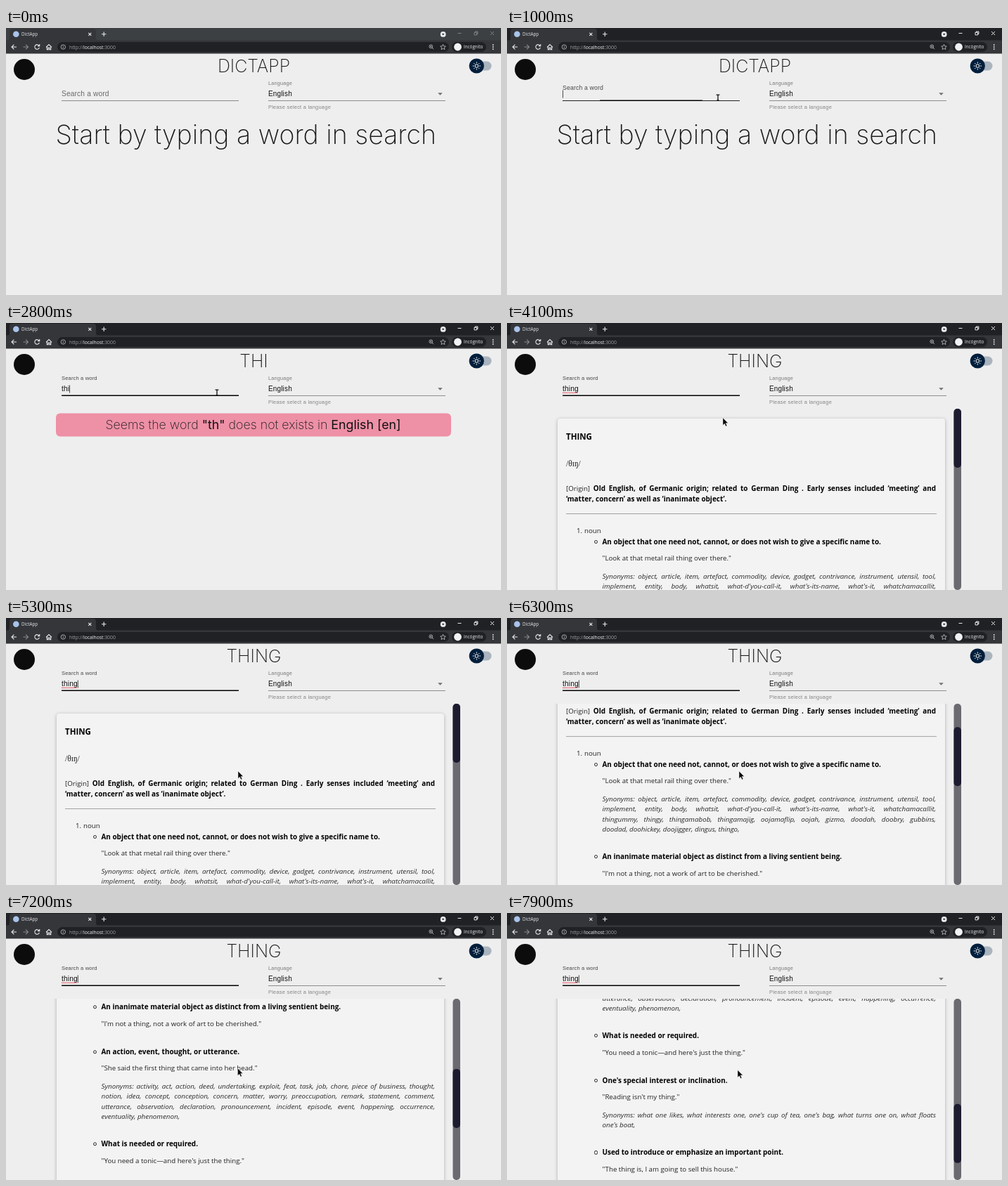
An HTML page that plays this animation: 704x380 px, repeating every 8 s.

```html
<!DOCTYPE html>
<html lang="en">
<head>
<meta charset="utf-8">
<title>DictApp</title>
<style>
  html, body { margin: 0; width: 704px; height: 380px; overflow: hidden; background: #eee; }
  svg { position: absolute; left: 0; top: 0; }
  .ui { font-family: "Open Sans", "Noto Sans", sans-serif; }
  .thin { font-family: Inter, Lato, sans-serif; font-weight: 200; fill: #1a1a1a; }
  .thin .em { font-weight: 400; fill: #111; }
  .form { font-family: "Liberation Sans", Arial, sans-serif; letter-spacing: .0094em; }
  #view { position: absolute; left: 0; top: 122px; width: 634px; height: 258px; overflow: hidden; }
  #doc { position: absolute; left: 0; top: -122px; width: 634px; height: 1000px; }
  #card { position: absolute; left: 72px; top: 136px; width: 551px; height: 900px; border-radius: 4px;
    background: #f3f3f3; box-shadow: 0 1px 5px rgba(0,0,0,.28); }
  .line { position: absolute; white-space: nowrap; line-height: 14.4px; color: #222;
    font: 9.7px/14.4px "Open Sans", "Noto Sans", sans-serif; }
  .fill { text-align: justify; text-align-last: justify; }
  .b, .line b { font-size: 9.95px; font-weight: 700; color: #000; }
  .i { font-size: 9.85px; font-style: italic; color: #2c2c2c; }
  .h { font-size: 11.5px; font-weight: 700; color: #000; }
  .ipa { font-family: "Liberation Serif", "Noto Serif", serif; font-size: 11.5px; }
  .dot { position: absolute; left: 124px; width: 3.4px; height: 3.4px; border: .8px solid #222; border-radius: 50%; }
  #rule { position: absolute; left: 84px; top: 271px; width: 527px; height: 1px; background: #a2a2a2; }
</style>
</head>
<body>
<svg width="704" height="380" viewBox="0 0 704 380">
  <rect width="704" height="380" fill="#eee"/>

  <!-- browser bar -->
  <rect id="strip" width="704" height="18" fill="#202124"/>
  <path d="M2 18Q5 18 5 14V5Q5 1 9 1H124Q128 1 128 5V14Q128 18 131 18Z" fill="#35363a"/>
  <rect y="17.5" width="704" height="19" fill="#35363a"/>
  <rect x="73" y="20" width="557" height="14" rx="7" fill="#202124"/>
  <rect x="634" y="20" width="49" height="14" rx="7" fill="#202124"/>
  <circle cx="14.3" cy="8.7" r="4.3" fill="#a9c4ea"/>
  <g class="ui" fill="#e8eaed">
    <text x="22" y="11" font-size="6.3">DictApp</text>
    <text x="90" y="29.5" font-size="6.8" fill="#9aa0a6">http://<tspan fill="#f1f3f4">localhost</tspan>:3000</text>
    <text x="651" y="29.2" font-size="6.3">Incógnito</text>
  </g>
  <circle cx="642.5" cy="27" r="5.4" fill="#f1f3f4"/>
  <g fill="none" stroke="#e8eaed" stroke-width="1.1">
    <path d="M117.3 6.8l4 4m0-4l-4 4M136 8.8h6.4m-3.2-3.2v6.4"/>
    <path d="M15 27H8m3.4-3.4L8 27l3.4 3.4"/>
    <path d="M24.500 27h7m-3.400-3.400L31.500 27l-3.400 3.400" stroke="#85888c"/>
    <path d="M47 25.2a3.300 3.300 0 1 0 .4 2.600M47.700 23v2.700h-2.700"/>
    <path d="M57 27.300L61 23.500l4 3.800M58.300 26.500V30.600h1.800V28h1.800v2.600h1.800V26.500"/>
    <g stroke="#c4c7cb" stroke-width=".8">
      <circle cx="81.300" cy="27" r="3.200"/>
      <path d="M81.300 26.500v2.200m0-3.600v.8"/>
      <circle cx="604.300" cy="26.300" r="2.400"/>
      <path d="M606 28l2.200 2.200M603.200 26.300h2.200m-1.100-1.100v2.200"/>
      <path d="M621.500 23.300l1.100 2.500 2.700.3-2 1.800.6 2.700-2.400-1.400-2.400 1.400.6-2.700-2-1.800 2.700-.3z"/>
    </g>
  </g>
  <g fill="#e8eaed">
    <circle cx="692.700" cy="24" r=".9"/><circle cx="692.700" cy="27" r=".9"/><circle cx="692.700" cy="30" r=".9"/>
    <circle cx="621.700" cy="8.900" r="3.900"/>
  </g>
  <path d="M619.900 8h3.600l-1.800 2.200z" fill="#202124"/>
  <path id="buttons" d="M642.500 7.500h5M666 6.300h3.600v3.600h-3.600zM667.300 6.300v-1.300h3.600v3.600h-1.300M689 5l5 5m0-5l-5 5" fill="none" stroke="#fff" stroke-width=".9"/>

  <!-- page header -->
  <circle cx="26" cy="59" r="15" fill="#0c0c0c"/>
  <text id="title" class="thin" x="352.500" y="63" font-size="25" text-anchor="middle"></text>
  <rect x="664" y="47.500" width="26.500" height="13" rx="6.500" fill="#aab4be"/>
  <circle cx="669.300" cy="54" r="10.600" fill="#001e3c"/>
  <g fill="none" stroke="#fff" stroke-width="1">
    <circle cx="669.300" cy="54" r="2.300"/>
    <path id="rays"/>
  </g>

  <!-- form -->
  <g class="form">
    <text id="label" font-size="10.200" fill="#6a6a6a">Search a word</text>
    <text id="typed" x="79" y="97.300" font-size="10.200" fill="#111"></text>
    <text x="373" y="81" font-size="7.400" fill="#7a7a7a">Language</text>
    <text x="373" y="97.300" font-size="10" fill="#111">English</text>
    <text x="373" y="115" font-size="7.450" fill="#858585" style="letter-spacing:.033em">Please select a language</text>
  </g>
  <path id="spell" d="M79 99.300H100.500" stroke="#e02a3a" stroke-width="1" stroke-dasharray="1.600 .6"/>
  <rect id="caret" y="88.500" width=".8" height="11" fill="#222"/>
  <path id="base" d="M79 103.500H331" stroke-width="1"/>
  <path id="focus" stroke="#000" stroke-width="1.600"/>
  <path d="M373 103.500H625" stroke="#8e8e8e" stroke-width="1"/>
  <path d="M614.200 92.300h6.600l-3.300 3.400z" fill="#707070"/>

  <!-- messages -->
  <text id="hint" class="thin" x="70.500" y="164.500" font-size="37.500">Start by typing a word in search</text>
  <g id="error">
    <rect x="71" y="128.500" width="562" height="33" rx="6" fill="#ee90a6"/>
    <text class="thin" x="351.500" y="151.300" font-size="17.800" text-anchor="middle">Seems the word <tspan id="miss" class="em"></tspan> does not exists in <tspan class="em">English [en]</tspan></text>
  </g>
</svg>

<div id="view"><div id="doc"><div id="card"></div><div id="rule"></div></div></div>

<svg width="704" height="380" viewBox="0 0 704 380">
  <g id="bar">
    <rect x="635.500" y="122" width="10.500" height="258" rx="5" fill="#6a6a70"/>
    <rect id="thumb" x="635.500" width="10.500" height="84" rx="5" fill="#1c1b30"/>
  </g>
  <path id="arrow" d="M0 0V10.500L2.400 8.300L4.200 12L5.900 11.200L4.200 7.600H7.400Z" fill="#0a0a0a" stroke="#fff" stroke-width=".4"/>
  <path id="beam" d="M-2.400 -3.800H2.400M0 -3.800V4M-1.600 4H1.600" fill="none" stroke="#111" stroke-width="1.300"/>
</svg>

<script>
const $ = id => document.getElementById(id);
const clamp = x => Math.max(0, Math.min(1, x));
const easeOut = x => 1 - (1 - clamp(x)) ** 3;
const show = (id, on) => $(id).style.display = on ? "" : "none";

const LOOP = 8000, TICK = 100, LEAD = 14.4;

// Dictionary entry
function line(x, y, html, cls, fill) {
  const el = document.createElement("div");
  el.className = "line " + cls + (fill ? " fill" : "");
  el.style.left = x + "px";
  el.style.top = y - LEAD / 2 + "px";
  if (fill) el.style.width = 610 - x + "px";
  el.innerHTML = html;
  $("doc").append(el);
}

function sense(y, def, quote, syn = []) {
  const dot = document.createElement("div");
  dot.className = "dot";
  dot.style.top = y - 2.3 + "px";
  $("doc").append(dot);
  line(135.500, y, def, "b");
  line(135.500, y += 24.6, '"' + quote + '"', "");
  syn.forEach((s, i) => line(135.500, y += i ? LEAD : 24.6, s, "i", i < syn.length - 1));
  return y + 39;
}

line(84, 162, "THING", "h");
line(84, 200, "/θɪŋ/", "ipa");
line(84, 235.500, "[Origin] <b>Old English, of Germanic origin; related to German Ding . Early senses included ‘meeting’ and</b>", "", true);
line(84, 250, "‘matter, concern’ as well as ‘inanimate object’.", "b");
line(99, 296, "1.", "");
line(110, 296, "noun", "");

const senses = [
  ["An object that one need not, cannot, or does not wish to give a specific name to.",
    "Look at that metal rail thing over there.",
    ["Synonyms: object, article, item, artefact, commodity, device, gadget, contrivance, instrument, utensil, tool,",
      "implement, entity, body, whatsit, what-d'you-call-it, what's-its-name, what's-it, whatchamacallit,",
      "thingummy, thingy, thingamabob, thingamajig, oojamaflip, oojah, gizmo, doodah, doobry, gubbins,",
      "doodad, doohickey, doojigger, dingus, thingo,"]],
  ["An inanimate material object as distinct from a living sentient being.",
    "I'm not a thing, not a work of art to be cherished."],
  ["An action, event, thought, or utterance.",
    "She said the first thing that came into her head.",
    ["Synonyms: activity, act, action, deed, undertaking, exploit, feat, task, job, chore, piece of business, thought,",
      "notion, idea, concept, conception, concern, matter, worry, preoccupation, remark, statement, comment,",
      "utterance, observation, declaration, pronouncement, incident, episode, event, happening, occurrence,",
      "eventuality, phenomenon,"]],
  ["What is needed or required.", "You need a tonic—and here's just the thing."],
  ["One's special interest or inclination.", "Reading isn't my thing.",
    ["Synonyms: what one likes, what interests one, one's cup of tea, one's bag, what turns one on, what floats",
      "one's boat,"]],
  ["Used to introduce or emphasize an important point.", "The thing is, I am going to sell this house."]
];
senses.reduce((y, s) => sense(y, ...s), 311);

let rays = "";
for (let i = 0; i < 8; i++) {
  const c = Math.cos(i * Math.PI / 4), s = Math.sin(i * Math.PI / 4);
  rays += `M${669.3 + 3.8 * c} ${54 + 3.8 * s}L${669.3 + 5.6 * c} ${54 + 5.6 * s}`;
}
$("rays").setAttribute("d", rays);

// Timeline
const WORD = "thing";
const keys = [2000, 2200, 2800, 2900, 3050];
const FOCUS = 950, FOUND = 3300;
const blinks = [FOCUS, 2000, 2200, 2800, 3050, 5775];
const wheel = [5600, 5900, 6320, 6530, 6740, 6950, 7220, 7450, 7650];
const mouse = [
  [300, 340, 250], [500, 330, 190], [700, 310, 120], [850, 300, 99], [4000, 300, 99],
  [4100, 307, 135], [4600, 330, 218], [6300, 330, 218], [7200, 329.5, 221], [7900, 328, 223.5]
];

function mouseAt(t) {
  let i = 0;
  while (i < mouse.length - 2 && t >= mouse[i + 1][0]) i++;
  const [t0, x0, y0] = mouse[i], [t1, x1, y1] = mouse[i + 1];
  const k = clamp((t - t0) / (t1 - t0));
  return [x0 + (x1 - x0) * k, y0 + (y1 - y0) * k];
}

function draw(t) {
  const active = t >= 300;
  $("strip").setAttribute("fill", active ? "#202124" : "#3c4043");
  $("buttons").setAttribute("stroke", active ? "#fff" : "#85888c");

  const text = WORD.slice(0, keys.filter(k => t >= k).length);
  $("title").textContent = text.toUpperCase() || "DICTAPP";
  $("typed").textContent = text;
  show("spell", t >= 3700);

  const p = easeOut((t - FOCUS) / 200);
  $("label").setAttribute("transform", `translate(79 ${97.3 - 16.4 * p}) scale(${1 - .25 * p})`);
  $("label").setAttribute("fill", p ? "#484848" : "#6a6a6a");
  $("focus").setAttribute("d", `M${205 - 126 * p} 103.300H${205 + 126 * p}`);
  show("focus", p > 0);

  const from = blinks.filter(b => t >= b).pop();
  show("caret", from !== undefined && (t - from) % 1060 < 530);
  $("caret").setAttribute("x", 79 + (text ? $("typed").getComputedTextLength() : 0));

  // The answer to each query arrives a little after the key
  const found = t >= FOUND;
  const missed = t >= 2400 ? "th" : t >= 2200 ? "t" : "";
  show("hint", !missed && !found);
  show("error", missed && !found);
  $("miss").textContent = `"${missed}"`;
  show("view", found);
  show("bar", found);

  const scroll = 51.45 * wheel.reduce((sum, w) => sum + easeOut((t - w) / 200), 0);
  $("doc").style.transform = `translateY(${-scroll}px)`;
  $("thumb").setAttribute("y", 122 + scroll * .3236);

  const [x, y] = mouseAt(t);
  const over = active && y > 82 && y < 108;
  $("base").setAttribute("stroke", over || p ? "#222" : "#8a8a8a");
  show("arrow", active && !over);
  show("beam", over);
  for (const id of ["arrow", "beam"]) $(id).setAttribute("transform", `translate(${x} ${y})`);
}

const start = performance.now();
function frame() {
  const t = (performance.now() - start) % LOOP;
  draw(Math.floor(t / TICK) * TICK);
  requestAnimationFrame(frame);
}
frame();
</script>
</body>
</html>
```
